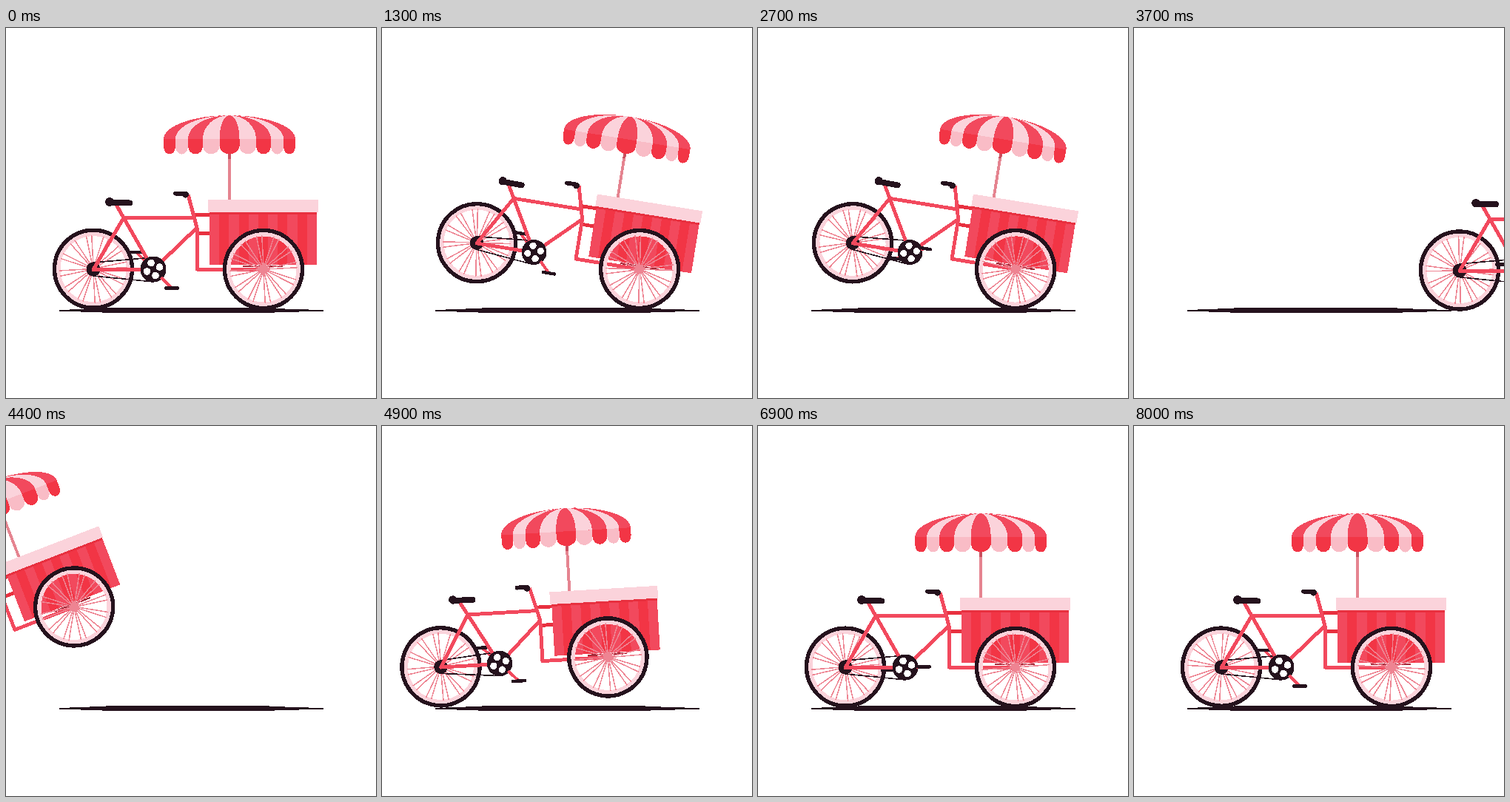
Recreate the animation shown at these times as an HTML page. Size 500 by 500 pixels, loop 9000 ms.

```html
<!DOCTYPE html>
<html lang="en">
<head>
<meta charset="utf-8">
<title>Cargo bike</title>
<style>
  html, body { margin: 0; width: 100%; height: 100%; overflow: hidden; background: #fff; }
  svg { display: block; width: 100vw; height: 100vh; shape-rendering: crispEdges; }
  .dark { fill: #25121d; }
  .line { fill: none; stroke: #25121d; stroke-linecap: round; }
  .tube { fill: none; stroke: #f2495d; stroke-width: 5; stroke-linejoin: round; }
  .arm { stroke-width: 4; }
  .spoke { stroke: #ee8492; stroke-width: 1.5; }
</style>
</head>
<body>
<svg viewBox="0 0 500 500">
  <defs>
    <g id="wheel">
      <circle r="47.5" fill="none" stroke="#fbd3db" stroke-width="6"/>
      <g id="spokes"></g>
      <circle r="52.5" fill="none" stroke="#25121d" stroke-width="5.4"/>
      <circle r="6" fill="#ee8492"/>
    </g>
  </defs>
  <path class="dark" d="M72 381L113 379.5L146 378H345L388 380L429 381V382.5L363 384.5H130L72 382.5Z"/>
  <g id="rear"><use href="#wheel"/></g>
  <line id="backArm" class="tube arm"/>
  <g id="backPedal"><path class="line" stroke-width="4.5" d="M-8 0H8"/></g>
  <g id="body">
    <g id="umbrella">
      <rect x="300" y="168" width="4" height="65" fill="#e58490"/>
      <rect x="300" y="168" width="4" height="9" fill="#c9505f"/>
      <g id="canopy"></g>
    </g>
    <path d="M254 252H277M258 277H277" stroke="#e8303f" stroke-width="5"/>
    <g id="stripes"></g>
    <rect x="275" y="249" width="145" height="3" fill="#e8303f"/>
    <rect x="273" y="232" width="148.5" height="17" fill="#fbd3db"/>
    <path d="M320 322H374" stroke="#a52a38" stroke-width="2.5"/>
    <circle class="dark" cx="118" cy="326" r="9.5"/>
    <path class="line" stroke-width="1.6" d="M118 317L199 310M118 335L199 343"/>
    <path class="tube" d="M148 237L159 256.5L199 326.5H118L159 256.5H256M199 326.5L258 270M246 225L258 270V326H348"/>
    <path class="line" stroke-width="8" d="M142 236L167 236.5"/>
    <circle class="dark" cx="140" cy="235" r="5.8"/>
    <path class="line" stroke-width="6" d="M229 223.5H242"/>
    <circle class="dark" cx="242.5" cy="225" r="4.5"/>
    <circle class="dark" cx="199" cy="326" r="17.5"/>
    <g id="holes" fill="#fff"></g>
  </g>
  <g id="front"><use href="#wheel"/></g>
  <line id="frontArm" class="tube arm"/>
  <circle id="axle" class="dark" r="4"/>
  <g id="frontPedal"><path class="line" stroke-width="4.5" d="M-8 0H8"/></g>
</svg>
<script>
const $ = id => document.getElementById(id);
const add = (parent, tag, attrs) => {
  const el = document.createElementNS('http://www.w3.org/2000/svg', tag);
  for (const k in attrs) el.setAttribute(k, attrs[k]);
  $(parent).append(el);
};

const SPOKES = 24, PITCH = 360 / SPOKES;
for (let i = 0; i < SPOKES; i++) {
  const a = i * PITCH * Math.PI / 180, b = a + (i % 2 ? 0.05 : -0.05);
  add('spokes', 'line', { class: 'spoke', x1: 5 * Math.cos(a), y1: 5 * Math.sin(a),
    x2: 46 * Math.cos(b), y2: 46 * Math.sin(b) });
}
for (let i = 0; i < 4; i++) {
  const a = i * Math.PI / 2 - 0.33;
  add('holes', 'circle', { cx: 199 + 9 * Math.cos(a), cy: 326 + 9 * Math.sin(a), r: 4.8 });
}
const STRIPE = 145 / 11;
for (let i = 0; i < 11; i++) {
  add('stripes', 'rect', { x: 275 + i * STRIPE, y: 249, width: STRIPE, height: 71,
    fill: i % 2 ? '#f23545' : '#f2495d' });
}

// Canopy: nested half ellipses, with a row of scallops below
const radii = [89, 73, 56, 36, 13.5];
const scallop = (x1, x2, fill) => {
  const m = (x1 + x2) / 2;
  add('canopy', 'path', { fill, d: `M${x1} 149.5H${x2}V160C${x2} 167 ${m + 4} 170.5 ${m} 170.5S${x1} 167 ${x1} 160Z` });
};
radii.forEach((r, i) => {
  const inner = radii[i + 1], color = i % 2 ? '#f9bcc6' : '#f23545';
  if (inner) {
    scallop(302 - r, 302 - inner, color);
    scallop(302 + inner, 302 + r, color);
  } else scallop(302 - r, 302 + r, color);
});
radii.forEach((r, i) => add('canopy', 'path', {
  d: `M${302 - r} 150A${r} 32 0 0 1 ${302 + r} 150Z`, fill: i % 2 ? '#fbd3db' : '#f2495d' }));

// A pose turns the bike about a pivot and shifts it.
// flip: second pedal position, lean: sideways offset of the umbrella
const REAR = [118, 325.7], FRONT = [348, 326], CRANK = [199, 326];
const pose = (deg, [px, py], dx, dy, flip, lean) => {
  const a = Math.cos(deg * Math.PI / 180), b = Math.sin(deg * Math.PI / 180);
  return { a, b, e: px + dx - a * px + b * py, f: py + dy - b * px - a * py, flip, lean };
};
const rest = pose(0, FRONT, 0, 0, 0, 0);
const tipped = pose(31, FRONT, 0.5, 0, 0, 0);
const landed = pose(0, FRONT, 0, 0, 1, 0);
const gone = pose(0, FRONT, 460, 2.5, 0, 0);
const wheelie = pose(-35, REAR, -385, -4, 0, -1.5);
const arrived = pose(0, FRONT, 0, 0, 0, -1.5);
const pedalled = pose(0, FRONT, 0, 0, 1, -1.5);

const moves = [
  [0, 1000, rest, rest],
  [1000, 2000, rest, tipped],
  [2000, 3000, tipped, landed],
  [3000, 4000, landed, gone],
  [4000, 5000, wheelie, arrived],
  [5000, 6000, arrived, pedalled],
  [6000, 8000, pedalled, rest],
  [8000, 9000, rest, rest]
];

const mix = (u, v, p) => u + (v - u) * p;
const at = (k, [x, y]) => [k.a * x - k.b * y + k.e, k.b * x + k.a * y + k.f];
const pedal = (k, side) => at(k, side > 0
  ? [CRANK[0] + 25, CRANK[1] + (k.flip ? -22 : 25.5)]
  : [CRANK[0] - 23, CRANK[1] + (k.flip ? 26 : -23)]);

function draw(t) {
  const [start, end, k0, k1] = moves.find(m => t < m[1]);
  const p = (t - start) / (end - start);
  const now = {};
  for (const n in k0) now[n] = mix(k0[n], k1[n], p);
  const { a, b, e, f, lean } = now;
  const move = (id, s) => $(id).setAttribute('transform', s);

  move('body', `matrix(${a} ${b} ${-b} ${a} ${e} ${f})`);
  move('umbrella', `translate(${lean})`);

  const spin = PITCH * Math.min(Math.max(t - 1000, 0), 7000) / 1000;
  move('rear', `translate(${at(now, REAR)}) rotate(${spin})`);
  move('front', `translate(${at(now, FRONT)}) rotate(${spin})`);

  const [cx, cy] = at(now, CRANK);
  move('axle', `translate(${cx} ${cy})`);
  for (const [name, side] of [['front', 1], ['back', -1]]) {
    const u = pedal(k0, side), v = pedal(k1, side);
    const x = mix(u[0], v[0], p), y = mix(u[1], v[1], p);
    move(name + 'Pedal', `matrix(${a} ${b} ${-b} ${a} ${x} ${y})`);
    const arm = $(name + 'Arm');
    // The front arm starts at the rim of the chainring
    const s = side > 0 ? Math.min(1, 15 / Math.hypot(x - cx, y - cy)) : 0;
    arm.setAttribute('x1', mix(cx, x, s));
    arm.setAttribute('y1', mix(cy, y, s));
    arm.setAttribute('x2', x);
    arm.setAttribute('y2', y);
  }
}

const origin = performance.now();
function tick() {
  const t = Math.max(0, performance.now() - origin) % 9000;
  draw(Math.floor(t / 100) * 100);
  requestAnimationFrame(tick);
}
tick();
</script>
</body>
</html>
```
